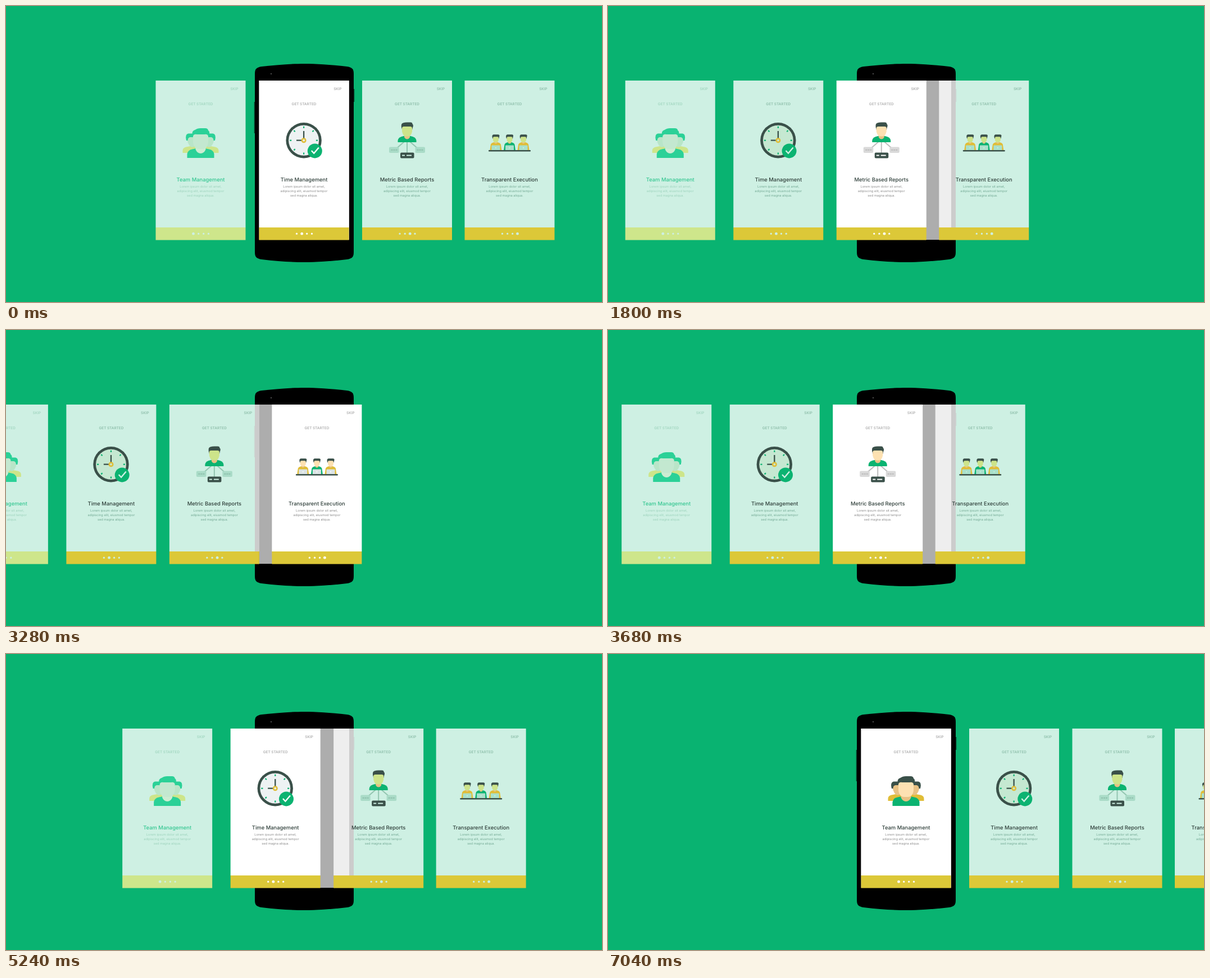
Animation, 1061 px wide and 528 px high, one loop 8040 ms. Source, as an HTML page:

```html
<!DOCTYPE html>
<html lang="en">
<head>
<meta charset="utf-8">
<title>Onboarding screens</title>
<style>
html, body { margin: 0; width: 100%; height: 100%; overflow: hidden; background: #09b371; }
svg { display: block; width: 1061px; height: 528px; }
text { font-family: Montserrat, Inter, sans-serif; text-anchor: middle; text-rendering: geometricPrecision; }
.card {
  --page: 1; --dark: #3a5049; --title: #2f3f3a; --green: #0bb371; --gold: #dcc838; --shirt: #e0bd37;
  --face: #fde1b2; --tan: #e8c184; --neck: #e8c184; --dial: #eef2f3; --label: #b0b0b0; --copy: #8d8d8d;
  --box: #d9d9d9; --wire: #bdbdbd; --mark: #b3b3b3; --laptop: #dbe3e4; --light: #fff;
}
.dim {
  --page: .8; --face: #cde48a; --dial: #c5e8d1; --label: #8fbfab; --copy: #74aa95;
  --box: #a9dbc7; --wire: #93c5b0; --mark: #87baa5; --laptop: #a9e0ca; --light: #cef0e3;
}
#card0.dim {
  --dark: #2bd197; --title: #35c792; --green: #2bd197; --gold: #cee68b; --shirt: #cde58a;
  --face: #c3e8d0; --tan: #b9e5c8; --neck: #cdecd2; --label: #a3d7c1; --copy: #9dd3bc;
}
.page { fill: #fff; fill-opacity: var(--page); }
.dark { fill: var(--dark); } .green { fill: var(--green); } .gold { fill: var(--gold); }
.shirt { fill: var(--shirt); } .face { fill: var(--face); } .tan { fill: var(--tan); }
.neck { fill: var(--neck); } .dial { fill: var(--dial); } .box { fill: var(--box); }
.laptop { fill: var(--laptop); } .light { fill: var(--light); }
.line { fill: none; }
.label { font-size: 6.4px; font-weight: 600; fill: var(--label); }
.title { font-size: 9.4px; font-weight: 500; fill: var(--title); }
.copy { font-size: 5.7px; fill: var(--copy); }
</style>
</head>
<body>
<svg viewBox="0 0 1061 528">
  <path fill="#06492f" d="M441.7 171h2v56h-2zM618.5 148h1.8v23h-1.8z"/>
  <path d="M443 121C443 112 446 109.500 455 108C485 104.500 510 103 531 103S577 104.500 607 108C616 109.500 619 112 619 121V439C619 448 616 450.500 607 452C577 455.500 552 457 531 457S485 455.500 455 452C446 450.500 443 448 443 439Z"/>
  <circle cx="472" cy="121" r=".9" fill="#777"/>
  <path fill="#adadad" d="M450.500 133h160.500v284h-160.500z"/>
  <g id="cards"></g>
</svg>
<script>
const rect = (cls, x, y, w, h, r = 0) =>
  `<rect class="${cls}" x="${x}" y="${y}" width="${w}" height="${h}" rx="${r}"/>`;
const disc = (cls, x, y, r) => `<circle class="${cls}" cx="${x}" cy="${y}" r="${r}"/>`;
const path = (cls, d) => `<path class="${cls}" d="${d}"/>`;
const line = (color, width, d) =>
  `<path class="line" stroke="var(--${color})" stroke-width="${width}" d="${d}"/>`;
const text = (cls, x, y, s) => `<text class="${cls}" x="${x}" y="${y}">${s}</text>`;
const mirror = s => s + `<g transform="scale(-1 1)">${s}</g>`;

// Icons are drawn around x = 0, the middle of a card.
function team() {
  const colleague =
    path('shirt', 'M-32 262V258Q-32 253 -26 251.500L-18 250H-6V262Z') +
    path('tan', 'M-24 234H-10V250Q-14 253 -18 251Q-23 246 -24 238Z') +
    path('dark', 'M-25.500 240Q-28.500 229 -22 227.500H-10V234H-19Q-23 235 -23 240Z');
  return mirror(colleague) +
    path('green', 'M-24 271V264Q-23 257 -15 255.500L-8 254H8L15 255.500Q23 257 24 264V271Z') +
    path('neck', 'M-9 250H9V256Q6 263 0 263T-9 256Z') +
    path('dark', 'M-13 235Q-18 223 -10 221Q-6 218 0 218H8Q13 218 13.500 222Q17 224 15 231L13 235Z') +
    path('face', 'M-13.500 232Q-12 228 -7 229H7Q12 228 13.500 232V243Q12 255 3 255H-3Q-12 255 -13.500 243Z');
}

function clock() {
  let ticks = '';
  for (let a = 0; a < 360; a += 45)
    ticks += `<rect class="green" x="-1.100" y="-25" width="2.200" height="3.200" transform="translate(-.4 239.700) rotate(${a})"/>`;
  return disc('dark', -.4, 239.7, 31.7) + disc('dial', -.4, 239.7, 27) + ticks +
    line('dark', 2.3, 'M-.4 223V239.700H-13.500') +
    disc('shirt', -.4, 239.7, 4.5) + disc('dial', -.4, 239.7, 1.9) +
    disc('green', 19.3, 258.4, 13) + line('light', 2.4, 'M13.300 258L17.700 262.700L26.300 252.500');
}

function reports() {
  const branch = line('wire', 2, 'M-5 242L-20 255') + rect('box', -32, 251.5, 17.5, 10.5, 2) +
    line('mark', 1.5, 'M-28.500 256.700h3m1 0h3m1 0h3');
  return mirror(branch) + line('wire', 2, 'M0 242V263') +
    rect('dark', -12, 261.5, 24.5, 10, 2) + line('light', 1.8, 'M-9 266.500h5m3 0h9') +
    path('green', 'M-16.500 243V240Q-16 235 -10 233L-4 231.500H4L10 233Q16 235 16.500 240V243Z') +
    path('tan', 'M-5 228H5V234Q3 237.500 0 237.500T-5 234Z') +
    path('dark', 'M-9 220Q-12.500 210 -7 208.500Q-4 207.500 0 207.500H6Q9.500 207.500 9.500 210.500Q12 212 10 217L9 221H-9Z') +
    path('face', 'M-9 217Q-8 214.500 -5 215H5Q8 214.500 9 217V224Q7 232.500 2 232.500H-2Q-7 232.500 -9 224Z');
}

function execution() {
  const worker = (x, shirt) => `<g transform="translate(${x})">` +
    path(shirt, 'M-10.500 257.500L-9 247Q-8 244 -3 243H3Q8 244 9 247L10.500 257.500Z') +
    path('tan', 'M-2.800 240H2.800V244Q0 247 -2.800 244Z') +
    path('dark', 'M-5.500 236.500Q-8 230 -4 229.300H4Q7 229.500 6.500 232L5.500 236.500Z') +
    path('face', 'M-5 234.500Q-4 233 -2 233.300H2Q4 233 5 234.500V239Q4 243.500 0 243.500T-5 239Z') +
    rect('laptop', -7.5, 248.5, 15, 9, 1) + disc('light', 0, 253, 1.1) + '</g>';
  return worker(-24.6, 'shirt') + worker(0, 'green') + worker(24.6, 'shirt') +
    rect('dark', -37.5, 257, 75, 2.5, 1);
}

const screens = [
  ['Team Management', team], ['Time Management', clock],
  ['Metric Based Reports', reports], ['Transparent Execution', execution]
];
const copy = ['Lorem ipsum dolor sit amet,', 'adipiscing elit, eiusmod tempor', 'sed magna aliqua.'];

document.getElementById('cards').innerHTML = screens.map(([title, icon], i) =>
  `<g id="card${i}">` + rect('page', -80, 133, 160, 262) + rect('gold', -80, 395, 160, 22.5) +
  text('label', 59.9, 150.4, 'SKIP') + text('label', 0, 177.3, 'GET STARTED') + icon() +
  text('title', 0, 312.5, title) + copy.map((s, n) => text('copy', 0, 324.3 + 8 * n, s)).join('') +
  [-13, -3.8, 5.2, 14].map((x, n) => disc('light', x, 406.2, n === i ? 2.4 : 1.6)).join('') + '</g>'
).join('');

const cards = screens.map((_, i) => document.getElementById('card' + i));
const LOOP = 8040, STEP = 80, RATE = .1205;
const rests = [530.5, 338, 154.5, -27];    // middle of the first card for each active screen
const gaps = [0, 192.5, 376, 558.5];
const slides = [[80, 1, 2, 8], [1720, 2, 3, 8], [3280, 3, 2, 8], [4840, 2, 1, 8], [6400, 1, 0, 9]];

function draw(now) {
  const t = now % LOOP;
  let from = 1, to = 1, p = 0, lag = 8.5;  // the first card starts closer to its neighbour
  for (const [start, a, b, steps] of slides) {
    if (t < start) break;
    const n = Math.floor((t - start) / STEP) + 1;
    [from, to] = [a, b];
    p = n < steps ? n * RATE : 1;
    lag = start === 80 ? 8.5 * (1 - p) : 0;
  }
  const x = rests[from] + (rests[to] - rests[from]) * p;
  const active = p < .5 ? from : to;
  cards.forEach((card, i) => {
    card.setAttribute('transform', `translate(${x + gaps[i] + (i ? 0 : lag)})`);
    card.setAttribute('class', i === active ? 'card' : 'card dim');
  });
  requestAnimationFrame(draw);
}
draw(performance.now());
</script>
</body>
</html>
```
